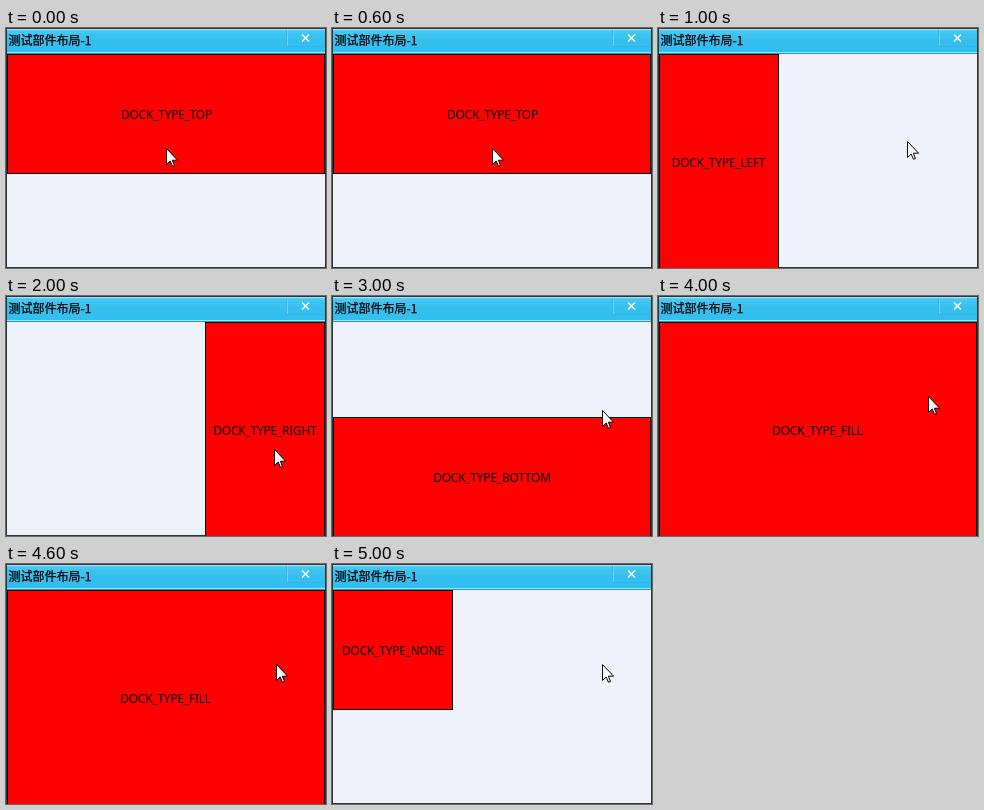
Animation of 320x240 px, one loop 6 s. Source, as an HTML page:

```html
<!DOCTYPE html>
<html lang="zh">
<head>
<meta charset="utf-8">
<title>Dock layout</title>
<style>
  html, body { margin: 0; width: 100%; height: 100%; overflow: hidden; }
  svg { display: block; width: 100%; height: 100%; }
  .title {
    font: 12px "Noto Sans CJK SC", "Noto Sans CJK", sans-serif;
    stroke: #000;
    stroke-width: .25;
  }
  .scene {
    visibility: hidden;
    animation: show 6s step-end infinite;
    animation-delay: calc(var(--i) * 1s - 6s);
  }
  .scene rect { fill: #f00; stroke: #000; }
  .scene text {
    font: 12px "Noto Sans", sans-serif;
    letter-spacing: -.25px;
    text-anchor: middle;
  }
  @keyframes show {
    0% { visibility: visible; }
    16.6666%, 100% { visibility: hidden; }
  }
</style>
</head>
<body>
<svg viewBox="0 0 320 240">
  <defs>
    <linearGradient id="bar" x2="0" y2="1">
      <stop offset="0" stop-color="#58cff5"/>
      <stop offset=".2" stop-color="#3fc4f0"/>
      <stop offset=".5" stop-color="#35bfee"/>
      <stop offset="1" stop-color="#30c0f2"/>
    </linearGradient>
    <path id="cursor" d="M.5 .5V16.5L4.2 13 6.4 18.2 8.5 17.6 6.4 12.2H11.6Z" fill="#fff" stroke="#000"/>
  </defs>

  <rect width="320" height="240" fill="#edf2fb"/>
  <rect x="1" y="1" width="318" height="24" fill="url(#bar)"/>
  <path d="M1 1.5H319" stroke="#a2e5fa"/>
  <path d="M1 24.5H319" stroke="#a5e3f8"/>
  <path d="M1 25.5H319" stroke="#2c93b8"/>
  <path d="M280.5 2V18.5H318" fill="none" stroke="#34b4e0"/>
  <path d="M281.5 2V18" stroke="#6fd5f6"/>
  <path d="M296 6.5L303 13.5M303 6.5L296 13.5" stroke="#fff" stroke-width="1.5"/>
  <text class="title" x="2.5" y="17">测试部件布局-1</text>
  <rect x=".5" y=".5" width="319" height="239" fill="none" stroke="#333"/>

  <g class="scene" style="--i:0">
    <rect x="1.5" y="26.5" width="317" height="119"/>
    <text x="160.5" y="91">DOCK_TYPE_TOP</text>
    <use href="#cursor" x="160" y="120"/>
  </g>
  <g class="scene" style="--i:1">
    <rect x="1.5" y="26.5" width="119" height="214"/>
    <text x="60.5" y="139">DOCK_TYPE_LEFT</text>
    <use href="#cursor" x="249" y="113"/>
  </g>
  <g class="scene" style="--i:2">
    <rect x="199.5" y="26.5" width="119" height="214"/>
    <text x="259" y="139">DOCK_TYPE_RIGHT</text>
    <use href="#cursor" x="268" y="153"/>
  </g>
  <g class="scene" style="--i:3">
    <rect x="1.5" y="121.5" width="317" height="119"/>
    <text x="160" y="186">DOCK_TYPE_BOTTOM</text>
    <use href="#cursor" x="270" y="114"/>
  </g>
  <g class="scene" style="--i:4">
    <rect x="1.5" y="26.5" width="317" height="214"/>
    <text x="159.5" y="139">DOCK_TYPE_FILL</text>
    <use href="#cursor" x="270" y="100"/>
  </g>
  <g class="scene" style="--i:5">
    <rect x="1.5" y="26.5" width="119" height="119"/>
    <text x="61" y="91">DOCK_TYPE_NONE</text>
    <use href="#cursor" x="270" y="100"/>
  </g>
</svg>
</body>
</html>
```
